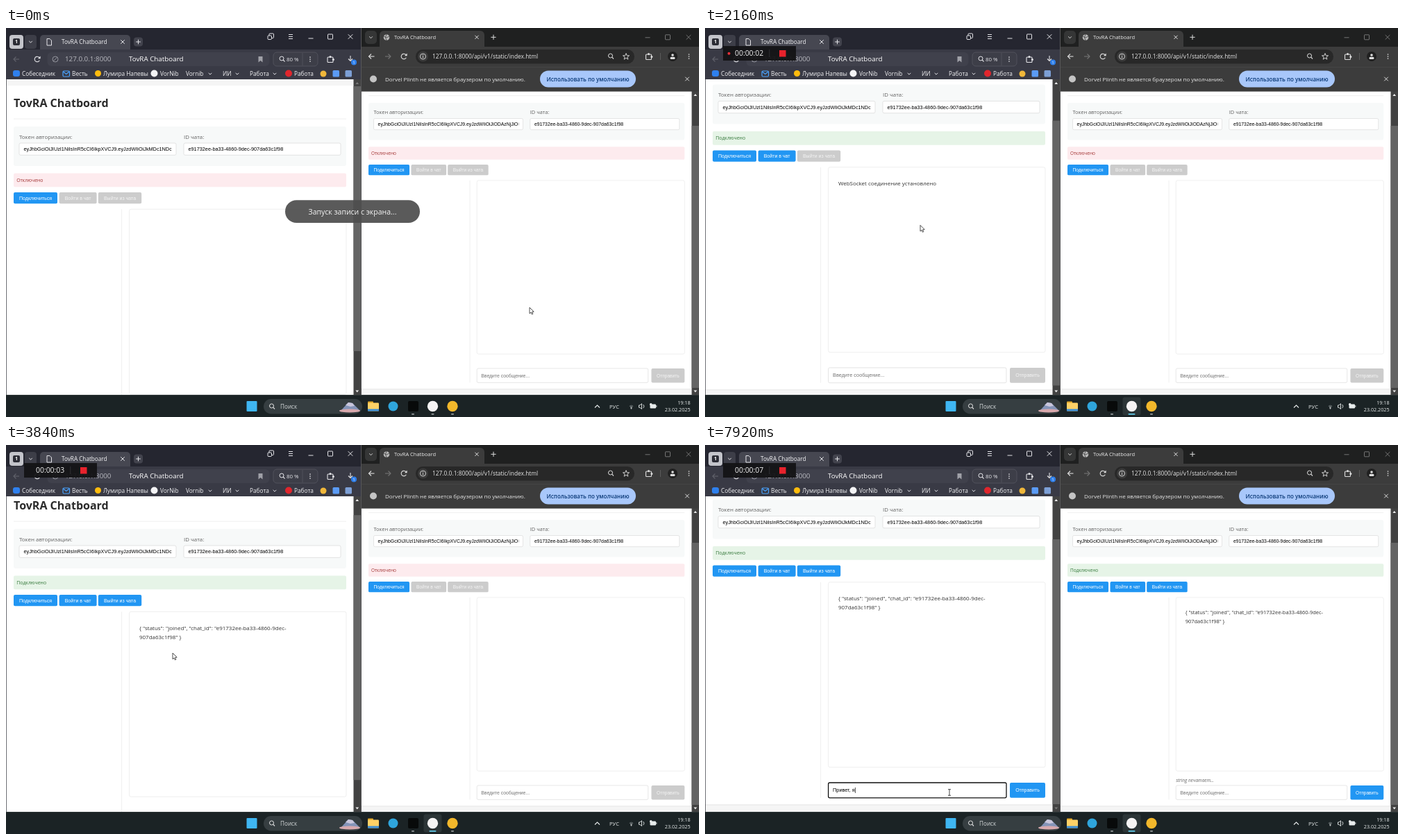
Animation of 998x561 px, one loop 8000 ms. Source, as an HTML page with a canvas:

```html
<!DOCTYPE html>
<html lang="ru">
<head>
<meta charset="utf-8">
<title>TovRA Chatboard</title>
<style>
html, body { margin: 0; width: 100%; height: 100%; overflow: hidden; background: #1c2424; }
canvas { display: block; width: 998px; height: 561px; }
</style>
</head>
<body>
<canvas id="stage"></canvas>
<script>
const W = 998, H = 561, LOOP = 8000, STEP = 80, BOTTOM = 529;
const UI = '"Open Sans", "Noto Sans", sans-serif';
const ARIAL = '"Liberation Sans", Arial, sans-serif';
const APP = 'TovRA Chatboard';
const CHAT_ID = 'e91732ee-ba33-4860-9dec-907da63c1f98';
const TOKEN = 'eyJhbGciOiJIUzI1NiIsInR5cCI6IkpXVCJ9.eyJzdWIiOiJ';
const HELLO = ['WebSocket соединение установлено'];
const JOINED = ['{ "status": "joined", "chat_id": "e91732ee-ba33-4860-9dec-', '907da63c1f98" }'];
const DRAFT = 'Привет, я';
const MAX_SCROLL = 63.5;

const cv = document.getElementById('stage');
const dpr = window.devicePixelRatio || 1;
cv.width = W * dpr;
cv.height = H * dpr;
const c = cv.getContext('2d');

// Event times, ms
const T = {
  toastEnd: 400, timer: 480,
  leftConnect: 1440, leftJoin: 3300,
  rightFocus: 4800, rightConnect: 4960, rightJoin: 5360,
  inputFocus: 6080, typing: 6450, perChar: 170
};

// Pointer: time, x, y
const PATH = [
  [0, 754, 403], [240, 754, 403], [880, 190, 286], [1040, 161, 262.6],
  [1280, 56, 246], [1600, 54, 246], [2080, 310, 284.4], [2480, 310, 284.4],
  [2880, 143, 270.6], [3120, 108, 246], [3440, 108, 246], [3840, 240, 300],
  [4240, 290, 310], [4720, 568, 211], [5000, 568, 211], [5200, 608, 207],
  [5400, 608, 207], [5920, 353, 506], [6080, 353, 506], [6400, 352, 501], [8000, 352, 501]
];

const clamp = v => Math.max(0, Math.min(1, v));
const easeOut = v => 1 - Math.pow(1 - clamp(v), 3);
const smooth = v => v * v * (3 - 2 * v);

function pointer(t) {
  let i = 0;
  while (i < PATH.length - 2 && PATH[i + 1][0] <= t) i++;
  const [t0, x0, y0] = PATH[i], [t1, x1, y1] = PATH[i + 1];
  const p = smooth(clamp((t - t0) / (t1 - t0)));
  return { x: x0 + (x1 - x0) * p, y: y0 + (y1 - y0) * p };
}

function scrollAt(t) {
  return MAX_SCROLL * (easeOut((t - 1955) / 320) - easeOut((t - 2360) / 300) + easeOut((t - 3800) / 320));
}

function rect(x, y, w, h, fill) {
  c.fillStyle = fill;
  c.fillRect(x, y, w, h);
}

function box(x, y, w, h, r, fill, stroke, lw = 0.6) {
  c.beginPath();
  c.roundRect(x, y, w, h, r);
  if (fill) { c.fillStyle = fill; c.fill(); }
  if (stroke) { c.strokeStyle = stroke; c.lineWidth = lw; c.stroke(); }
}

function dot(x, y, r, fill, stroke, lw = 1) {
  c.beginPath();
  c.arc(x, y, r, 0, 7);
  if (fill) { c.fillStyle = fill; c.fill(); }
  if (stroke) { c.strokeStyle = stroke; c.lineWidth = lw; c.stroke(); }
}

function poly(color, lw, ...pts) {
  c.beginPath();
  for (let i = 0; i < pts.length; i += 2) c.lineTo(pts[i], pts[i + 1]);
  if (lw) { c.strokeStyle = color; c.lineWidth = lw; c.stroke(); }
  else { c.fillStyle = color; c.fill(); }
}

// y is the middle of the capitals
function text(s, x, y, size, color, style = '', family = UI, align = 'left') {
  c.font = `${style} ${size}px ${family}`;
  c.textAlign = align;
  c.fillStyle = color;
  c.fillText(s, x, y + size * 0.355);
}

const chevron = (x, y, col, r = 2.3) => poly(col, 1, x - r, y - r / 2, x, y + r / 2, x + r, y - r / 2);
const plus = (x, y, r, col) => { poly(col, 1, x - r, y, x + r, y); poly(col, 1, x, y - r, x, y + r); };
const cross = (x, y, r, col) => {
  poly(col, 1, x - r, y - r, x + r, y + r);
  poly(col, 1, x - r, y + r, x + r, y - r);
};

function arrow(x, y, dir, col) {
  poly(col, 1.1, x - 4, y, x + 4, y);
  poly(col, 1.1, x + dir * 0.5, y - 3.5, x + dir * 4, y, x + dir * 0.5, y + 3.5);
}

function reload(x, y, col) {
  c.beginPath();
  c.arc(x, y, 3.8, 0.5, 5.6);
  c.strokeStyle = col;
  c.lineWidth = 1.1;
  c.stroke();
  poly(col, 0, x + 4.6, y - 4.5, x + 4.6, y - 0.8, x + 1, y - 0.8);
}

function puzzle(x, y, col) {
  box(x - 4, y - 3, 8, 7.5, 1, null, col, 1.1);
  dot(x, y - 3.6, 1.5, col);
  dot(x + 4.4, y + 0.5, 1.5, col);
}

function dots(x, y, col) {
  for (const d of [-3, 0, 3]) dot(x, y + d, 0.85, col);
}

function lens(x, y, col) {
  dot(x, y, 3, null, col, 1);
  poly(col, 1.1, x + 2.2, y + 2.2, x + 4.5, y + 4.5);
}

function windowButtons(xs, y, drop, col) {
  poly(col, 1, xs[0] - 3.5, y + drop, xs[0] + 3.5, y + drop);
  box(xs[1] - 3.5, y - 3.5, 7, 7, 0.5, null, col, 1);
  cross(xs[2], y, 3.3, col);
}

function scrollbar(x, w, top, y0, y1, upCol, downCol) {
  rect(x, top, w, BOTTOM - top, '#424242');
  rect(x, y0, w, y1 - y0, '#646464');
  const m = x + w / 2;
  poly(upCol, 0, m - 2.4, top + 7, m, top + 4, m + 2.4, top + 7);
  poly(downCol, 0, m - 2.4, BOTTOM - 6.5, m, BOTTOM - 3.5, m + 2.4, BOTTOM - 6.5);
}

// One chat page; its origin is the top left of the settings panel
function page(x, y, k, w, s, mouse) {
  const mx = (mouse.x - x) / k, my = (mouse.y - y) / k;
  const over = (bx, by, bw, bh) => mx >= bx && mx <= bx + bw && my >= by && my <= by + bh;

  function button(bx, by, bw, bh, label, on) {
    const hover = on && over(bx, by, bw, bh);
    if (hover) mouse.kind = 'hand';
    box(bx, by, bw, bh, 2, !on ? '#cccccc' : hover ? '#1976d2' : '#2196f3');
    text(label, bx + bw / 2, by + bh / 2, 7, on ? '#ffffff' : '#f4f4f4', '', ARIAL, 'center');
  }

  function input(bx, by, bw, bh, value, color, focus) {
    if (over(bx, by, bw, bh)) mouse.kind = 'beam';
    box(bx, by, bw, bh, 2, '#fff', focus ? '#101010' : '#d9d9d9', focus ? 1.3 : 0.7);
    c.save();
    c.beginPath();
    c.rect(bx + 6, by, bw - 12.5, bh);
    c.clip();
    text(value, bx + 6.5, by + bh / 2, 7.3, color, '', ARIAL);
    if (focus) {
      const cx = bx + 6.8 + (value === s.draft ? c.measureText(value).width : 0);
      rect(cx, by + bh / 2 - 4, 0.7, 8, '#000');
    }
    c.restore();
  }

  c.save();
  c.translate(x, y);
  c.scale(k, k);
  rect(-12, -59, w + 24, 499, '#fff');
  rect(-12, 440, w + 24, 1, '#e6e6e6');
  text(APP, 0, -33.5, 16, '#2b2b2b', 'bold');
  rect(0, -11.3, w, 0.7, '#e8e8e8');

  box(0, 0, w, 57, 3, '#f7f9f9');
  const fw = (w - 27) / 2, f2 = 19 + fw;
  text('Токен авторизации:', 8, 14.7, 7.9, '#606060');
  text('ID чата:', f2, 14.7, 7.9, '#606060');
  input(8, 24, fw, 17.3, TOKEN + s.token, '#000');
  input(f2, 24, fw, 17.3, CHAT_ID, '#000');

  box(0, 67.5, w, 19.7, 2, s.connected ? '#e6f4e7' : '#fdebee');
  text(s.connected ? 'Подключено' : 'Отключено', 4.2, 77.4, 6.9, s.connected ? '#34783a' : '#a23333');
  button(0, 95, 63, 16.3, 'Подключиться', true);
  button(65.6, 95, 54, 16.3, 'Войти в чат', s.connected);
  button(121.8, 95, 62.4, 16.3, 'Выйти из чата', s.joined);

  rect(155.4, 119.3, 0.7, 311, '#e8e8e8');
  box(166.6, 119.3, w - 166.6, 267, 2.5, '#fff', '#e2e2e2');
  const lines = s.joined ? JOINED : s.connected ? HELLO : [];
  lines.forEach((l, i) => text(l, 181, 142.7 + i * 13.4, 7.98, '#333'));
  if (s.peerTyping) text('string печатает...', 166.6, 401, 6.9, '#666', 'italic');

  input(166.6, 408.5, w - 222.6, 21.8, s.draft || 'Введите сообщение...', s.draft ? '#000' : '#757575', s.focus);
  button(w - 51, 408.5, 51, 21.8, 'Отправить', s.joined);
  c.restore();
}

function clipped(x, y, w, h, draw) {
  c.save();
  c.beginPath();
  c.rect(x, y, w, h);
  c.clip();
  draw();
  c.restore();
}

function leftChrome() {
  const ink = '#e4e4e8', dim = '#62636c';
  rect(0, 0, 511, 32, '#252630');
  rect(0, 31, 511, 43, '#393a45');
  box(5, 10, 20, 20, 4, '#c3c4ca');
  box(10, 15, 10, 10, 2, '#2b2c35');
  text('1', 15, 20, 7, '#fff', 'bold', UI, 'center');
  box(27, 10, 17, 20, 4, '#3d3e48');
  chevron(35.5, 20, ink);
  box(49, 10, 130, 21, [5, 5, 0, 0], '#464751');
  poly(ink, 1, 59, 15.5, 63, 15.5, 65.5, 18, 65.5, 25, 59, 25, 59, 15.5);
  text(APP, 80, 20, 8.2, '#f4f4f6');
  cross(168, 20, 2.8, ink);
  box(184, 13.5, 13, 13, 4, '#42434d');
  plus(190.5, 20, 3.3, ink);
  box(379, 8, 6.5, 6.5, 1, null, ink, 1);
  box(377, 11, 5.5, 5.5, 1, '#252630', ink, 1);
  for (const y of [9.5, 12.5, 15.5]) poly(ink, 1, 407, y, 413, y);
  windowButtons([439, 467, 496], 12.5, 2.5, ink);

  arrow(15, 45, -1, dim);
  reload(45, 45, ink);
  box(59.5, 35, 320, 20, 6, '#40414c');
  dot(71, 45, 4, null, '#91929a', 1);
  poly('#91929a', 1, 68, 48, 74, 42);
  text('127.0.0.1:8000', 85, 45, 9.8, '#b9bac0');
  text(APP, 177, 45, 9.8, '#fff', '500');
  poly('#a0a1a8', 0, 363.5, 41, 369.5, 41, 369.5, 49.5, 366.5, 47, 363.5, 49.5);
  box(385, 35, 64, 20, 5, '#3d3e48', '#565761', 0.8);
  lens(397, 44, ink);
  text('80 %', 404, 45, 7.9, ink);
  poly('#565761', 0.8, 427, 36, 427, 54);
  dots(438, 45, ink);
  puzzle(467, 45, ink);
  poly(ink, 1.1, 496, 40, 496, 47);
  poly(ink, 1.1, 493, 44.5, 496, 47.5, 499, 44.5);
  dot(501, 49.5, 4, '#2f80ed');
  text('1', 501, 49.5, 6, '#fff', '', UI, 'center');

  const mark = (s, x) => text(s, x, 66, 8.3, '#f4f4f6', '500');
  box(10, 61, 10, 9, 3, '#2f80ed');
  mark('Собеседник', 23);
  box(82, 62, 9.5, 8, 1.5, null, '#4aa3ff', 1.2);
  poly('#4aa3ff', 1.2, 82.5, 63, 86.7, 66.5, 91, 63);
  mark('Весть', 95);
  dot(132.5, 65.5, 4.5, '#ffbc0d');
  mark('Лумира Напевы', 140);
  dot(213.5, 65.5, 5, '#f4f4f6');
  mark('VorNib', 222);
  mark('Vornib', 259);
  chevron(294, 66, ink);
  mark('ИИ', 312);
  chevron(333, 66, ink);
  mark('Работа', 351);
  chevron(387, 66, ink);
  dot(407, 65.5, 5, '#e0262d');
  mark('Работа', 415);
  dot(457, 66, 4.5, '#f0b73a');
  box(470.5, 61, 9.5, 9.5, 1.5, '#5b9bf5');
  box(488.5, 61, 9.5, 9.5, 1.5, '#7d9fd6');
}

function rightChrome(active) {
  const ink = '#dedede', grey = '#747474';
  rect(511, 0, 0.8, BOTTOM, '#303032');
  rect(512, 0, 486, 28, '#1f2020');
  rect(512, 27, 486, 64.6, '#3c3c3c');
  box(517, 4, 17, 19, 5, '#353636');
  chevron(525.5, 13.5, ink);
  box(538, 4, 151, 25, [6, 6, 0, 0], '#3c3c3c');
  dot(548, 13.5, 4.3, '#b8b8b8');
  poly('#3c3c3c', 0.8, 544, 12, 548, 14, 552, 12);
  poly('#3c3c3c', 0.8, 548, 9, 546.5, 13.5, 548, 18);
  text(APP, 559, 13.3, 7.5, '#e8e8e8');
  cross(678, 13.3, 2.6, ink);
  plus(702, 13.3, 3.6, ink);
  windowButtons([924, 953, 983], 13.3, 0.5, active ? '#f0f0f0' : grey);

  arrow(526.5, 41, -1, ink);
  arrow(550, 41, 1, grey);
  reload(573, 41, ink);
  box(590, 31, 315, 20.5, 10, '#282828');
  dot(600.5, 41, 7.5, '#3c3c3c');
  dot(600.5, 41, 4, null, ink, 0.9);
  poly(ink, 1, 600.5, 40.5, 600.5, 43.2);
  dot(600.5, 38.9, 0.6, ink);
  text('127.0.0.1:8000/api/v1/static/index.html', 614, 41, 8.4, '#e6e6e6');
  lens(870.5, 40, ink);
  c.beginPath();
  for (let i = 0; i < 10; i++) {
    const r = i % 2 ? 2 : 4.8, a = i * Math.PI / 5 - Math.PI / 2;
    c.lineTo(893 + r * Math.cos(a), 41.3 + r * Math.sin(a));
  }
  c.closePath();
  c.strokeStyle = ink;
  c.lineWidth = 0.9;
  c.stroke();
  puzzle(925.5, 41, ink);
  poly('#5a5a5a', 1, 942.5, 36, 942.5, 46);
  dot(960, 41, 7, '#202020');
  dot(960, 39, 1.8, ink);
  box(956.5, 41.8, 7, 3.2, 1.5, ink);
  dots(983.5, 41, ink);

  rect(512, 56, 486, 0.7, '#4a4a4a');
  dot(529, 73.5, 5, '#c4c4c4');
  text('Dorvel Plinth не является браузером по умолчанию.', 546, 74, 8, '#e6e6e6');
  box(769, 61.5, 138, 24, 12, '#a8c7fa');
  text('Использовать по умолчанию', 838, 74, 8, '#0b3a78', '600', UI, 'center');
  cross(981, 73.5, 2.8, ink);
}

function taskbar(active) {
  rect(0, BOTTOM, W, H - BOTTOM, '#1b2325');
  rect(0, BOTTOM, W, 0.8, '#343c3e');
  box(346.5, 538, 15, 15, 1, '#3fb6f2');
  box(371, 535, 142, 21.5, 10.7, '#363e41');
  lens(382.5, 545, '#e4e4e4');
  text('Поиск', 395, 546, 8.2, '#d4d8d9');
  poly('#8494b8', 0, 483, 551, 493, 540, 499, 541, 510, 552);
  poly('#c9c6dc', 0, 489, 544, 493, 540, 499, 541, 502, 545, 496, 546);
  c.beginPath();
  c.ellipse(495, 552, 15, 2.6, 0, 0, 7);
  c.fillStyle = '#d8a9ad';
  c.fill();

  const slots = [586, 614.5, 643];
  if (active >= 0) box(slots[active] - 13, 532.5, 26, 26, 3, '#2c3537');
  box(521, 538.5, 8, 5, 1, '#e0a323');
  box(521, 540.5, 16, 12, 1.2, '#ffd166');
  rect(521, 549.5, 16, 3, '#3d8fd8');
  dot(557.5, 545.5, 7, '#2fa5dc');
  box(579, 538, 15, 15, 2, '#080a0a');
  dot(614.5, 545.5, 7.7, '#f6f4f4');
  dot(643, 545.5, 7.7, '#f2b72b');
  slots.forEach((x, i) => {
    const on = i === active, w = on ? 10 : 4;
    box(x - w / 2, 556, w, 1.7, 0.8, on ? '#5fc9e8' : '#949a9c');
  });

  const ink = '#e8ecec';
  poly(ink, 1.1, 848, 547.5, 851.5, 544, 855, 547.5);
  text('РУС', 869, 546, 7.6, ink);
  for (const r of [2, 4]) {
    c.beginPath();
    c.arc(900.5, 548.5, r, -2.3, -0.85);
    c.strokeStyle = r > 3 ? '#7d8587' : ink;
    c.lineWidth = 1;
    c.stroke();
  }
  dot(900.5, 548.5, 0.9, ink);
  poly(ink, 0.9, 911.5, 544, 913, 544, 915.5, 541.8, 915.5, 549.5, 913, 547.3, 911.5, 547.3, 911.5, 544);
  c.beginPath();
  c.arc(915.5, 545.6, 3.3, -0.9, 0.9);
  c.stroke();
  box(927.5, 542.5, 8.5, 6, 1.2, ink);
  rect(936.3, 544.3, 1, 2.4, ink);
  dot(928.7, 542.8, 1.8, ink);
  text('19:18', 985.5, 540, 7.2, ink, '', UI, 'right');
  text('23.02.2025', 985.5, 550.5, 7.2, ink, '', UI, 'right');
}

function timer(t) {
  const e = Math.max(0, t - 20), sec = Math.floor(e / 1000);
  rect(26, 26, 105, 21, 'rgba(20,20,22,.94)');
  if (e % 1000 < 500) dot(34.5, 36.7, 2, '#e8313a');
  text('00:00:0' + sec, 43, 36.7, 10.4, '#f4f4f4');
  rect(92.5, 31, 0.7, 11, '#3a3a3e');
  rect(107, 32, 9.5, 9.5, '#e8222c');
}

function toast(alpha) {
  c.globalAlpha = alpha;
  box(402, 248.3, 194, 32.7, 16.3, 'rgba(78,78,78,.93)');
  text('Запуск записи с экрана...', 499, 265, 10.5, '#f6f6f6', '', UI, 'center');
  c.globalAlpha = 1;
}

function cursor({ x, y, kind }) {
  c.save();
  c.translate(x, y);
  c.lineJoin = 'round';
  if (kind === 'beam') {
    poly('#333', 0.9, -2, -4.3, 2, -4.3);
    poly('#333', 0.9, 0, -4.3, 0, 4.3);
    poly('#333', 0.9, -2, 4.3, 2, 4.3);
  } else {
    const pts = kind === 'hand'
      ? [-0.9, 0, 0.7, 0, 0.9, 4, 4.8, 5, 4.8, 8.5, 3.6, 11.5, -1, 11.5, -3.4, 7.5, -2.8, 6.3, -0.9, 8, -0.9, 0]
      : [0, 0, 0, 8.8, 2, 7, 3.4, 10, 4.8, 9.3, 3.5, 6.4, 6.2, 6.2, 0, 0];
    poly('#fff', 0, ...pts);
    poly('#222', 0.8, ...pts);
  }
  c.restore();
}

function draw(t) {
  const mouse = pointer(t), scroll = scrollAt(t);
  const typed = Math.floor((t - T.typing) / T.perChar) + 1;
  const left = {
    token: 'kMDc1NDc1', connected: t >= T.leftConnect, joined: t >= T.leftJoin,
    focus: t >= T.inputFocus, draft: DRAFT.slice(0, Math.max(0, typed))
  };
  const right = {
    token: 'iODAzNjJiOGQ', connected: t >= T.rightConnect, joined: t >= T.rightJoin,
    peerTyping: typed > 0, draft: ''
  };
  const rightActive = t >= T.rightFocus && t < T.inputFocus;
  const active = t < T.leftConnect - 80 ? -1 : rightActive ? 2 : 1;

  c.setTransform(dpr, 0, 0, dpr, 0, 0);
  rect(0, 0, W, H, '#f5f5f5');
  clipped(0, 74, 500.5, BOTTOM - 74, () => page(11, 142 - scroll, 1, 479, left, mouse));
  clipped(511.8, 91, 475.7, BOTTOM - 91, () => page(522, 108, 0.9375, 485.6, right, mouse));
  rect(0, 74, 0.7, BOTTOM - 74, '#303138');

  const off = scroll / MAX_SCROLL, hi = '#f0f0f0', lo = '#7a7a7a';
  scrollbar(500.5, 10.5, 74, 84 + 52 * off, 466 + 52 * off, off > 0.01 ? hi : lo, off < 0.99 ? hi : lo);
  scrollbar(987.5, 10.5, 91, 141, 519, hi, hi);
  leftChrome();
  rightChrome(rightActive);
  taskbar(active);
  if (t < T.toastEnd) toast(clamp((T.toastEnd - t) / 160));
  if (t >= T.timer) timer(t);
  cursor(mouse);
}

const start = performance.now();
function frame() {
  const t = (performance.now() - start) % LOOP;
  draw(Math.floor(t / STEP) * STEP);
  requestAnimationFrame(frame);
}
frame();
</script>
</body>
</html>
```
